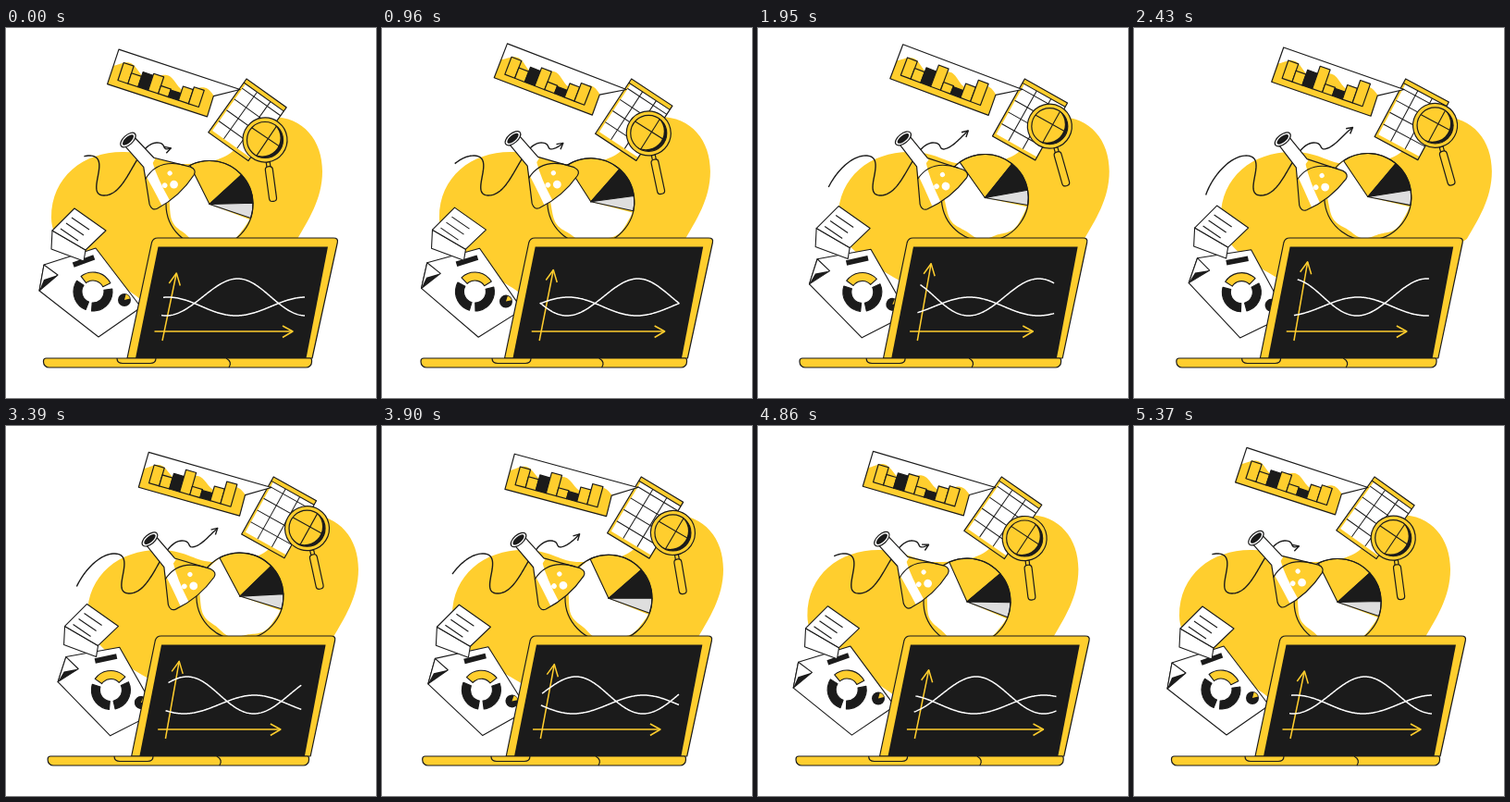
Write an HTML page with a canvas that moves like this. It is 400 px wide and 400 px high and loops after 5400 ms.

```html
<!DOCTYPE html>
<html lang="en">
<head>
<meta charset="utf-8">
<title>Data analysis</title>
<style>
html, body { margin: 0; width: 100%; height: 100%; overflow: hidden; background: #fff; }
canvas { display: block; width: 400px; height: 400px; }
</style>
</head>
<body>
<canvas id="stage"></canvas>
<script>
const LOOP = 5400, STEP = 30, TAU = Math.PI * 2, DEG = Math.PI / 180;
const YELLOW = '#ffce2e', INK = '#1b1b1b', WHITE = '#fff', GREY = '#dedede';

const canvas = document.getElementById('stage');
const g = canvas.getContext('2d');
const ratio = window.devicePixelRatio || 1;
canvas.width = canvas.height = 400 * ratio;

// Current position in the loop: turn 0..1, its cosine and sine, and the sway 0..1
let turn, cosT, sinT, sway;

const osc = (mid, c, s = 0) => mid + c * cosT + s * sinT;
const lerp = (a, b) => a + (b - a) * sway;

function paint(fill, line, width = 1.2) {
  if (fill) { g.fillStyle = fill; g.fill(); }
  if (line) { g.strokeStyle = line; g.lineWidth = width; g.stroke(); }
}

function trace(pts, closed) {
  g.beginPath();
  for (let i = 0; i < pts.length; i += 2) g.lineTo(pts[i], pts[i + 1]);
  if (closed) g.closePath();
}

function poly(pts, fill, line, width) {
  trace(pts, true);
  paint(fill, line, width);
}

function line(pts, color = INK, width = 1.1) {
  trace(pts);
  paint(null, color, width);
}

function box(x, y, w, h, fill, stroke, radius = 0) {
  g.beginPath();
  g.roundRect(x, y, w, h, radius);
  paint(fill, stroke);
}

function oval(x, y, rx, ry, fill, stroke) {
  g.beginPath();
  g.ellipse(x, y, rx, ry, 0, 0, TAU);
  paint(fill, stroke);
}

const disc = (x, y, r, fill, stroke) => oval(x, y, r, r, fill, stroke);

// Ring segment or, with no inner radius, a pie slice; angles in canvas degrees
function slice(r, inner, from, to, fill, stroke) {
  g.beginPath();
  g.arc(0, 0, r, from * DEG, to * DEG);
  g.arc(0, 0, inner, to * DEG, from * DEG, true);
  g.closePath();
  paint(fill, stroke, 1.1);
}

function shape(d, fill, stroke, width = 1.2) {
  const p = new Path2D(d);
  if (fill) { g.fillStyle = fill; g.fill(p); }
  if (stroke) { g.strokeStyle = stroke; g.lineWidth = width; g.stroke(p); }
}

function placed(x, y, deg, draw) {
  g.save();
  g.translate(x, y);
  g.rotate(deg * DEG);
  draw();
  g.restore();
}

function blob() {
  placed(46 * sway, 0, 0, () => shape(
    'M49 205C49 160 85 133 128 134C160 135 165 148 190 147C222 147 242 141 252 125' +
    'C262 108 265 96 287 96C322 96 342 122 342 155C342 185 326 209 315 228L290 245' +
    'L148 296C120 268 49 250 49 205Z', YELLOW));
}

const trail = document.createElementNS('http://www.w3.org/2000/svg', 'path');
trail.setAttribute('d', 'M78 182C84 162 104 138 122 138C148 138 116 181 138 181' +
  'C164 181 172 125 195 124C207 124 199 134 210 130C220 126 228 114 238 107');
const trailLength = trail.getTotalLength();

// A fixed curve that slides right while both of its ends grow
function squiggle() {
  const from = lerp(60, 0), to = trailLength - lerp(36, 0);
  placed(32 * (sway - 1), 0, 0, () => {
    const pts = [];
    for (let i = 0; i <= 120; i++) {
      const p = trail.getPointAtLength(from + (to - from) * i / 120);
      pts.push(p.x, p.y);
    }
    line(pts, INK, 1.4);
    const [bx, by, , , ex, ey] = pts.slice(-6);
    placed(ex, ey, Math.atan2(ey - by, ex - bx) / DEG,
      () => line([-6.5, -3.6, 0, 0, -6.5, 3.6], INK, 1.4));
  });
}

function table() {
  const w = 53, h = 71;
  placed(260 + 34.5 * sway, 55, 35.5 - 7.5 * sway, () => {
    box(0, 0, w, h, YELLOW);
    box(2.5, 5, w - 2.5, h - 9, WHITE);
    for (let y = 11; y < h - 5; y += 14.5) line([2, y, w, y], INK, 1);
    for (const x of [w / 3, w * 2 / 3]) line([x, 5, x, h - 4], INK, 1);
    line([0, 5, w, 5]);
    box(0, 0, w, h, null, INK);
  });
}

function bubble() {
  placed(253 + 40 * sway, 66.5, osc(18.3, 0, 3.1), () => {
    const frame = [-138, 0, 0, 0, -25, 15.7, -24.5, 39, -138, 39.5];
    poly(frame, WHITE);
    const hills = [-24.5, 39, -138, 39.5];
    for (let x = -138; x <= -25; x++) hills.push(x, 15 - 5 * Math.cos(TAU * (x + 122) / 43));
    poly(hills, YELLOW);
    poly(frame, null, INK);
    [12, 20, 15, 13, 23, 24, 16, 13].forEach((top, i) => {
      const y = top - sway * (i % 4 === 3 ? 7 : 0.5);
      const dark = i === 2 || i === 5;
      box(-128.5 + 11.5 * i, y, 11.5, 32 - y, dark ? INK : YELLOW, INK);
    });
  });
}

function magnifier() {
  const x = osc(304.3, -24.3, -6), y = osc(113.5, 7.5, -3.3);
  placed(x, y, -osc(11.5, -3.8, 2.5), () => {
    box(-2, 24, 4, 8, YELLOW, INK);
    box(-4, 29, 8, 38, YELLOW, INK, 3.5);
    disc(0, 0, 24, YELLOW, INK);
  });
  placed(x, y, 0, () => {
    g.beginPath();
    g.arc(0, 0, 19.5, 0, TAU);
    g.clip();
    placed(0, 0, 34 - 6 * sway, () => {
      line([-22, -3, 22, -3]);
      line([2, -22, 2, 22]);
    });
    g.beginPath();
    g.rect(-30, -30, 60, 60);
    g.arc(-3, -2, 19.5, 0, TAU, true);
    paint(INK);
  });
  disc(x, y, 19.5, null, INK);
}

function pie() {
  placed(osc(237.5, -17.5, -4.5), osc(186.5, 4, -0.5), -osc(3.5, -3, 5), () => {
    disc(0, 0, 47, YELLOW);
    // The white part has an edge that ripples more towards the bottom
    const white = [0, 0];
    for (let k = 0; k <= 1; k += 0.01) {
      const a = -(116 + 225 * k) * DEG, bulge = Math.sin(Math.PI * k);
      const r = 46.5 - bulge * (3.5 + 3 * k * Math.sin(28 * k));
      white.push(r * Math.cos(a), r * Math.sin(a));
    }
    poly(white, WHITE);
    slice(47, 0, -116, -42, YELLOW, INK);
    slice(47, 0, -42, -1, INK, INK);
    slice(47, 0, -1, 19, GREY, INK);
    disc(0, 0, 47, null, INK);
  });
}

function flask() {
  const body = 'M-7 2L-7.5 33L-30 67Q-33 74 -27 76Q0 83 27 76Q33 74 30 67L7.5 33L7 2Z';
  placed(osc(146.5, -14.5, 1.5), osc(121, 0, -2), -osc(40.5, 2, -1), () => {
    shape(body, YELLOW);
    shape('M-7 2L-7.5 33L-12 41Q-3 38 7.5 35L7 2Z', WHITE);
    shape('M-8 34L3 36Q-5 52 -11 79L-21 77Q-15 55 -12 41Z', WHITE);
    shape('M-15 44Q10 36 27 62', null, INK, 1.1);
    disc(9, 57, 2.6, WHITE);
    disc(-4, 63, 2.8, WHITE);
    disc(4, 69, 4.4, WHITE);
    shape(body, null, INK);
    oval(0, 0, 10, 5.2, WHITE, INK);
    oval(0, 0, 7.6, 3.3, INK);
  });
}

// One rigid sheet that turns about its lower corner
function report() {
  placed(100 + 15 * sway, 334 + sway, 9.2 * sway, () => {
    poly([-59, -78, -64, -50, 0, 0, 46, -32, -3, -96], WHITE, INK, 1.1);
    poly([-59, -78, -44, -67, -64, -50], WHITE, INK, 1.1);
    poly([-64, -50, -44, -67, -59, -62], INK);
    placed(-16, -82, -20, () => box(-12, -2.8, 24, 5.6, INK));
    placed(-6, -49, -29 * sway, () => {
      for (let k = 0; k < 3; k++) {
        const from = -128 + 120 * k;
        slice(21, 12, from, from + 102, k ? INK : YELLOW, INK);
      }
    });
    placed(28, -40, 0, () => {
      disc(0, 0, 7, INK);
      slice(6.2, 0, -75, -15, YELLOW);
    });
  });
}

function letter() {
  placed(74 + 16 * sway, 195 - 3 * sway, 0, () => {
    poly([-24, 24, 12, 45, 10, 57, -25, 44], WHITE, INK, 1.1);
    poly([0, 0, 34, 24, 12, 45, -24, 24], WHITE, INK, 1.1);
    for (let k = 0; k < 3; k++) line([-3 - 6 * k, 10 + 6 * k, 16 - 6 * k, 23 + 6 * k]);
  });
}

function wave(mid, amp) {
  const peak = 249 + 150 * turn;
  const left = lerp(169, 174), right = lerp(323, 319.5);
  const pts = [];
  for (let x = left; x <= right; x++) {
    const y = mid - amp * Math.cos(TAU * (x - peak) / 150);
    pts.push(x + (301 - y) * 0.1 * (right - x) / (right - left), y);
  }
  line(pts, WHITE, 1.5);
}

function laptop() {
  // Lid and base narrow a little as the scene sways
  const lid = x => x + sway * (5.5 - (x - 131) / 26);
  const base = x => x + sway * (5.5 - (x - 40.5) / 32);

  g.beginPath();
  g.moveTo(lid(131), 357);
  g.lineTo(lid(157.5), 232);
  g.quadraticCurveTo(lid(159), 227, lid(164), 227);
  g.lineTo(lid(354), 227);
  g.quadraticCurveTo(lid(359.5), 227, lid(358.3), 232);
  g.lineTo(lid(331), 357);
  g.closePath();
  paint(YELLOW, INK);
  poly([lid(164.5), 236.5, lid(348), 236.5, lid(324.5), 357, lid(140), 357], INK);

  const tipX = lid(184.3), tipY = lerp(265, 252.5), end = lerp(310, 294.5);
  line([lid(169), 338, tipX, tipY], YELLOW, 1.5);
  line([tipX - 8, tipY + 11, tipX, tipY, tipX + 4, tipY + 13.5], YELLOW, 1.5);
  line([lid(160.5), 328, end, 328], YELLOW, 1.5);
  line([end - 11, 322, end, 328, end - 11, 334.5], YELLOW, 1.5);
  wave(291, 20);
  wave(301, -10);

  box(base(40.5), 357, base(330.5) - base(40.5), 10, YELLOW, INK, [3, 2, 6, 6]);
  placed(-3.5 * sway, 0, 0, () =>
    shape('M120 357Q120 362.5 126 362.5H156Q162 362.5 162 357', null, INK));
  placed(-12 * sway, 0, 0, () => shape('M238 357Q245 361 241 367', null, INK));
}

function render(ms) {
  turn = Math.floor((ms % LOOP) / STEP) * STEP / LOOP;
  cosT = Math.cos(turn * TAU);
  sinT = Math.sin(turn * TAU);
  sway = (1 - cosT) / 2;
  g.setTransform(ratio, 0, 0, ratio, 0, 0);
  g.fillStyle = WHITE;
  g.fillRect(0, 0, 400, 400);
  g.lineJoin = 'round';
  for (const part of [blob, pie, squiggle, flask, table, bubble, magnifier, report, letter, laptop]) part();
}

const start = performance.now();
function tick() {
  render(performance.now() - start);
  requestAnimationFrame(tick);
}
tick();
</script>
</body>
</html>
```
